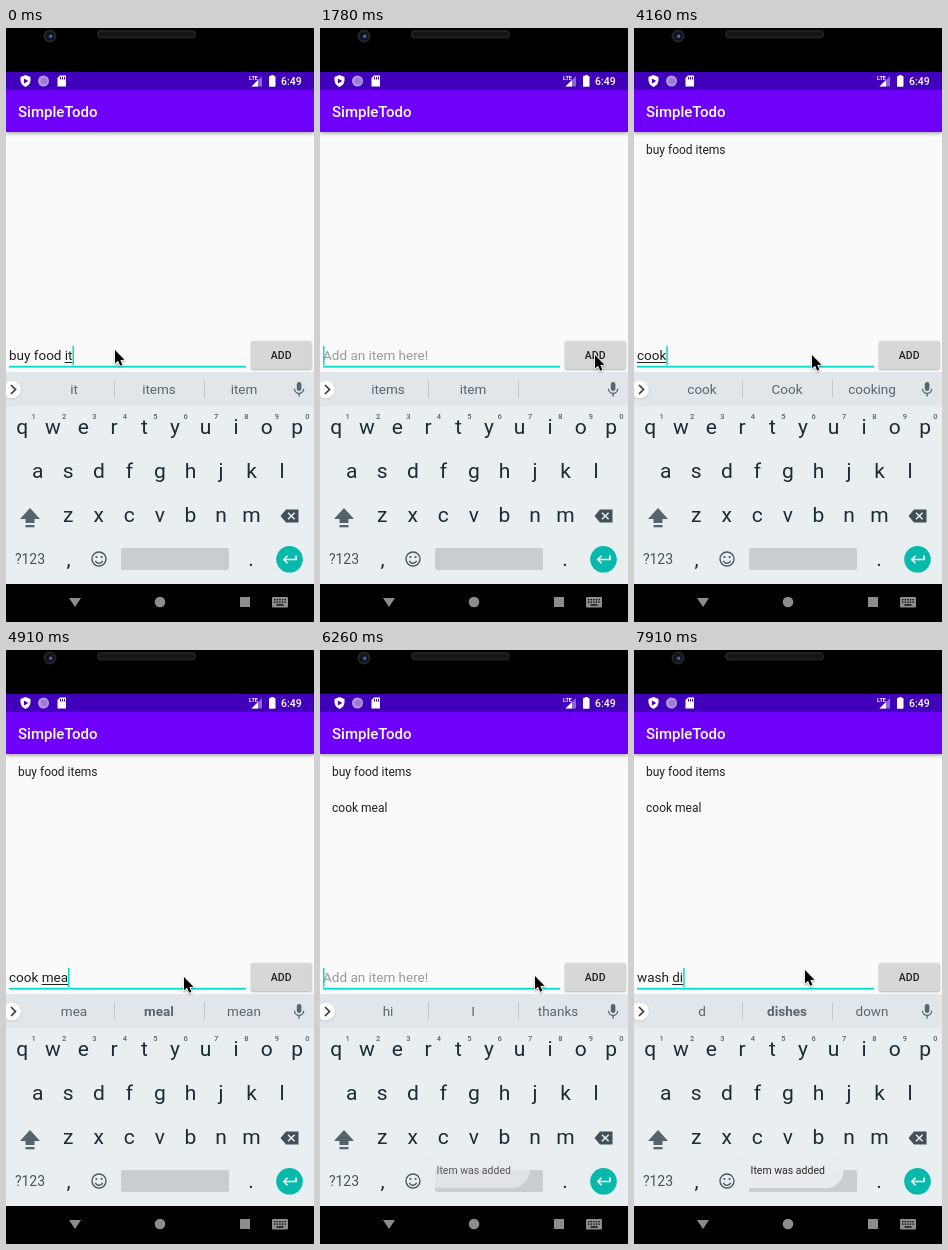
An HTML page with a canvas for the animation above (8000 ms loop, 308x594 px).

```html
<!DOCTYPE html>
<html lang="en">
<head>
<meta charset="utf-8">
<title>SimpleTodo</title>
<style>
html, body { margin: 0; width: 308px; height: 594px; overflow: hidden; background: #000; }
canvas { display: block; }
</style>
</head>
<body>
<canvas id="stage" width="308" height="594"></canvas>
<script>
const ctx = document.getElementById('stage').getContext('2d');
const LOOP = 8000, STEP = 149.1;
const TEAL = '#06dbc8', KEYS = '#e9eef1', INK = '#1d2b33', GREY = '#5a666d';

// Step at which the field holds a text, and the words offered for it
const typing = [
  [0, 'buy food it', 'it,items,item'],
  [1, 'buy food item', 'item,items,itemized'],
  [2, 'buy food items', 'items,item,'],
  [10, '', 'items,item,'],
  [12, '', 'hi,I,thanks'],
  [24, 'c', 'c,can,call'],
  [25, 'co', 'co,come,could'],
  [26, 'coo', 'coo,cook,cool'],
  [27, 'cook', 'cook,Cook,cooking'],
  [29, 'cook ', 'for,and,dinner'],
  [30, 'cook m', 'm,my,me'],
  [31, 'cook me', 'me,my,meal'],
  [32, 'cook mea', 'mea,*meal,mean'],
  [33, 'cook meal', 'meal,*me,Mel'],
  [39, '', 'meal,*me,Mel'],
  [41, '', 'hi,I,thanks'],
  [49, 'w', 'w,we,with'],
  [50, 'was', 'was,want,wash'],
  [51, 'wash', 'wash,Wash,washing'],
  [52, 'wash d', 'the,my,dishes'],
  [53, 'wash di', 'd,*dishes,down']
];
const caretOff = [[6, 8], [13, 15], [19, 22], [36, 38], [43, 46]];
const pointer = [
  [3, 109, 322], [4, 138, 329], [5, 205, 335], [6, 262, 332], [7, 275, 327],
  [12, 275, 327], [13, 262, 331], [15, 205, 331], [17, 178, 327],
  [33, 178, 327], [35, 236, 332], [37, 275, 327],
  [40, 275, 327], [42, 215, 326], [44, 173, 321], [46, 171, 320]
];
const added = [12, 41];

function pointerAt(k) {
  let a = pointer[0];
  for (const b of pointer) {
    if (b[0] >= k) {
      const u = b[0] === a[0] ? 0 : Math.max(0, (k - a[0]) / (b[0] - a[0]));
      return [a[1] + (b[1] - a[1]) * u, a[2] + (b[2] - a[2]) * u];
    }
    a = b;
  }
  return [a[1], a[2]];
}

function toastAlpha(r) {
  if (r < 0) return 0;
  const enter = Math.min(1, (r + 0.6) / 3.3);
  const exit = Math.min(1, Math.max(0, (r - 11.3) / 3.3));
  return 1 - (1 - enter) ** 2 - exit ** 2;
}

function rect(x, y, w, h, fill) {
  ctx.fillStyle = fill;
  ctx.fillRect(x, y, w, h);
}
function round(x, y, w, h, r, fill) {
  ctx.fillStyle = fill;
  ctx.beginPath();
  ctx.roundRect(x, y, w, h, r);
  ctx.fill();
}
function disc(x, y, r, fill) {
  ctx.fillStyle = fill;
  ctx.beginPath();
  ctx.arc(x, y, r, 0, 7);
  ctx.fill();
}
function trace(pts) {
  ctx.beginPath();
  for (let i = 0; i < pts.length; i += 2) ctx.lineTo(pts[i], pts[i + 1]);
}
function poly(pts, fill) {
  trace(pts);
  ctx.fillStyle = fill;
  ctx.fill();
}
function line(pts, color, width) {
  trace(pts);
  ctx.strokeStyle = color;
  ctx.lineWidth = width;
  ctx.stroke();
}
function text(s, x, y, size, color, align = 'left', weight = 400) {
  ctx.font = `${weight} ${size}px Roboto, sans-serif`;
  ctx.textAlign = align;
  ctx.fillStyle = color;
  ctx.fillText(s, x, y);
}
function shadowed(color, blur, dy, draw) {
  ctx.save();
  ctx.shadowColor = color;
  ctx.shadowBlur = blur;
  ctx.shadowOffsetY = dy;
  draw();
  ctx.restore();
}

function drawBars() {
  rect(0, 0, 308, 594, '#000');
  rect(0, 62, 308, 282, '#fafafa');
  shadowed('rgba(0,0,0,.4)', 4, 1, () => rect(0, 62, 308, 42, '#6f00fa'));
  rect(0, 44, 308, 18, '#4100b9');
  text('SimpleTodo', 12, 89, 15, '#fff', 'left', 500);

  // Camera and speaker
  disc(44, 8, 6.5, '#252527');
  disc(44, 8, 4.5, '#10131c');
  disc(44.5, 8.5, 2, '#2b4687');
  disc(45, 8, 0.8, '#8fa9e0');
  round(91, 2, 99, 8.5, 4, '#202020');
  round(93, 4, 95, 4.5, 2, '#151515');

  // Status icons
  ctx.fillStyle = '#fff';
  ctx.beginPath();
  ctx.moveTo(19.5, 47);
  ctx.lineTo(24.5, 49);
  ctx.lineTo(24.5, 52.5);
  ctx.quadraticCurveTo(24, 57, 19.5, 59);
  ctx.quadraticCurveTo(15, 57, 14.5, 52.5);
  ctx.lineTo(14.5, 49);
  ctx.fill();
  poly([18, 50.5, 22.3, 53, 18, 55.5], '#4100b9');
  disc(37.5, 53, 5.5, '#b499e2');
  disc(38, 53, 3.5, '#9b7cd6');
  poly([54, 47.5, 60, 47.5, 60, 58.5, 51.5, 58.5, 51.5, 50], '#fff');
  for (let i = 0; i < 3; i++) rect(54 + i * 2, 49, 1, 2.5, '#4100b9');
  text('LTE', 243, 52, 5.5, '#fff', 'left', 700);
  poly([256, 48, 256, 58.5, 245.5, 58.5], 'rgba(255,255,255,.4)');
  poly([252, 52, 252, 58.5, 245.5, 58.5], '#fff');
  rect(264.8, 47, 3, 2, '#fff');
  round(263, 48, 6.5, 10.7, 0.8, '#fff');
  text('6:49', 275, 57, 10.5, '#fff', 'left', 500);

  // Navigation
  const nav = '#8c8c8c';
  poly([63, 570, 75, 570, 69, 579], nav);
  disc(154, 574, 5.3, nav);
  rect(234, 569, 10, 10, nav);
  round(266, 569, 16, 10.5, 1, nav);
  for (let r = 0; r < 2; r++)
    for (let c = 0; c < 5; c++) rect(268 + c * 2.6, 571 + r * 2.5, 1.3, 1.3, '#000');
  rect(270.5, 576.3, 7, 1.3, '#000');
}

function drawKeyboard(words) {
  rect(0, 344, 308, 34, '#e1e6ea');
  rect(0, 378, 308, 178, KEYS);

  shadowed('rgba(0,0,0,.2)', 2, 0.5, () => disc(6, 361.5, 9, '#fff'));
  line([5, 357, 9.5, 361.5, 5, 366], '#2d383e', 1.6);
  rect(108, 352, 1, 18, '#c2c8cc');
  rect(198, 352, 1, 18, '#c2c8cc');
  words.split(',').forEach((w, i) => {
    const bold = w[0] === '*';
    text(bold ? w.slice(1) : w, 68 + 85 * i, 366, 13.5, GREY, 'center', bold ? 700 : 400);
  });

  // Microphone
  round(290.8, 354, 4.6, 9, 2.3, GREY);
  ctx.beginPath();
  ctx.arc(293.1, 360.7, 4.6, 0, Math.PI);
  ctx.strokeStyle = GREY;
  ctx.lineWidth = 1.3;
  ctx.stroke();
  line([293.1, 365, 293.1, 368.5], GREY, 1.4);

  const rows = [['qwertyuiop', 16.3, 406], ['asdfghjkl', 31.7, 450], ['zxcvbnm', 62.2, 494]];
  for (const [keys, x0, y] of rows)
    [...keys].forEach((c, i) => text(c, x0 + 30.55 * i, y, 21, INK, 'center'));
  for (let i = 0; i < 10; i++)
    text((i + 1) % 10, 27.7 + 30.4 * i, 391, 7.5, '#57646b', 'center', 500);

  // Shift and delete
  poly([24, 480, 34, 491, 28.5, 491, 28.5, 495, 19.5, 495, 19.5, 491, 14, 491], '#56636a');
  rect(19.5, 497, 9, 2.3, '#56636a');
  poly([280, 481.5, 292.5, 481.5, 292.5, 494.5, 280, 494.5, 274.5, 488], '#435057');
  line([282, 484.8, 288.6, 491.3], KEYS, 1.5);
  line([288.6, 484.8, 282, 491.3], KEYS, 1.5);

  text('?123', 24, 536, 14, '#47545b', 'center');
  text(',', 62.5, 538, 21, INK, 'center');
  text('.', 245, 538, 21, INK, 'center');
  ctx.strokeStyle = '#4b585f';
  ctx.lineWidth = 1.4;
  ctx.beginPath();
  ctx.arc(93, 531, 7, 0, 7);
  ctx.stroke();
  ctx.beginPath();
  ctx.arc(93, 531.5, 3.8, 0.35, Math.PI - 0.35);
  ctx.stroke();
  disc(90.4, 529, 1.1, '#4b585f');
  disc(95.6, 529, 1.1, '#4b585f');
  round(115, 520, 108, 22, 2, '#c8cdd1');
  disc(283.5, 531.3, 13.3, '#06b9aa');
  line([290, 527.5, 290, 531.5, 278, 531.5], '#fff', 1.6);
  line([281.5, 527.8, 277.8, 531.5, 281.5, 535.2], '#fff', 1.6);
}

function drawField(s, caret) {
  rect(3, 337.8, 237, 1.8, TEAL);
  if (s) {
    text(s, 3, 332, 13.5, '#202020');
    const start = s.lastIndexOf(' ') + 1;
    const x = 3 + ctx.measureText(s.slice(0, start)).width;
    rect(x, 334, ctx.measureText(s.slice(start)).width, 1, '#202020');
  } else {
    text('Add an item here!', 3, 332, 13.5, '#9a9a9a');
  }
  if (caret) rect(3 + (s ? ctx.measureText(s).width : 0), 318, 1.5, 19, TEAL);
}

function drawButton(press) {
  const fill = ['#d6d7d7', '#c6c7c7', '#b7b8b8'][press];
  shadowed('rgba(0,0,0,.35)', 2 + press, 0.8 + press * 0.5,
    () => round(245, 313, 60.5, 28, 1.5, fill));
  text('ADD', 275.2, 331, 10.5, '#202020', 'center', 500);
}

function drawToast(alpha) {
  if (alpha <= 0) return;
  ctx.save();
  ctx.globalAlpha = alpha;
  round(98, 503, 111.5, 35, 17.5, '#eaeef0');
  text('Item was added', 153.7, 524, 10.5, '#222', 'center');
  ctx.restore();
}

function drawPointer([x, y]) {
  ctx.save();
  ctx.translate(x, y);
  ctx.lineJoin = 'round';
  shadowed('rgba(0,0,0,.35)', 2, 1, () => {
    trace([0, 0, 0, 13.6, 3.1, 10.8, 5.2, 15.8, 7.4, 14.8, 5.3, 9.9, 9.5, 9.7]);
    ctx.closePath();
    ctx.lineWidth = 1.6;
    ctx.strokeStyle = '#fff';
    ctx.stroke();
  });
  ctx.fillStyle = '#000';
  ctx.fill();
  ctx.restore();
}

function draw(t) {
  const k = Math.min(53, Math.floor((t + 8) / STEP));
  const [, value, words] = typing.filter(e => e[0] <= k).pop();
  const caret = !caretOff.some(([a, b]) => k >= a && k <= b);
  const press = k === 10 || k === 39 ? 2 : k === 9 || k === 38 ? 1 : 0;

  drawBars();
  ['buy food items', 'cook meal'].forEach((s, i) => {
    if (k >= added[i]) text(s, 12, 126 + 36 * i, 12, '#202020');
  });
  drawButton(press);
  drawField(value, caret);
  drawKeyboard(words);
  for (const a of added) drawToast(toastAlpha(k - a));
  drawPointer(pointerAt(k));
}

const t0 = performance.now();
function tick() {
  draw((performance.now() - t0) % LOOP);
  requestAnimationFrame(tick);
}
tick();
</script>
</body>
</html>
```
